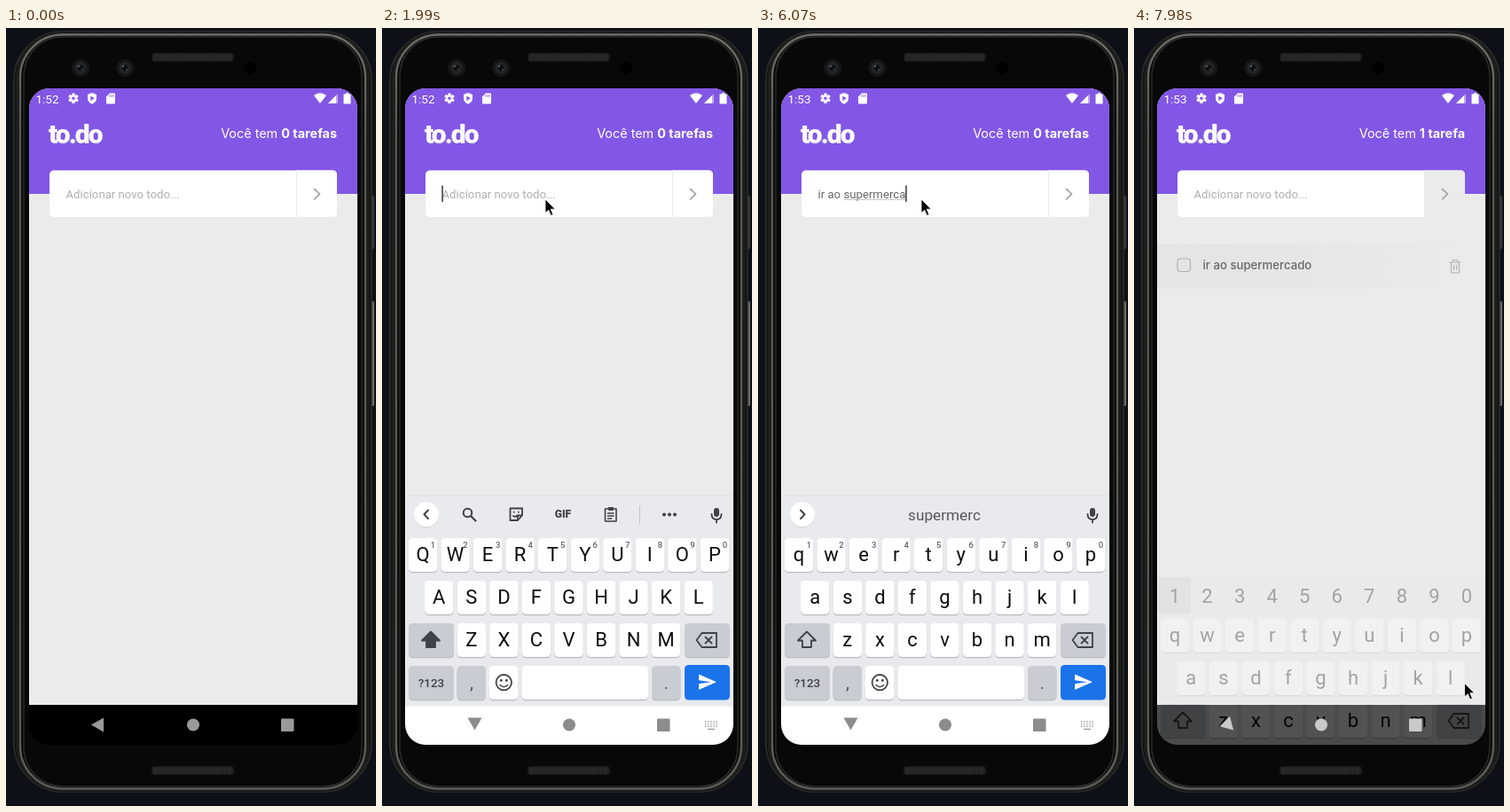
Recreate the animation shown at these times as an HTML page. Size 417 by 877 pixels, loop 8000 ms.

```html
<!DOCTYPE html>
<html lang="pt">
<head>
<meta charset="utf-8">
<title>to.do</title>
<style>
html, body { margin: 0; width: 100%; height: 100%; overflow: hidden; background: #0d1117; }
svg { display: block; }
text { font-family: Roboto, sans-serif; white-space: pre; }
.inter { font-family: Inter, sans-serif; }
.mid { text-anchor: middle; }
.line { fill: none; stroke-linecap: round; stroke-linejoin: round; }
</style>
</head>
<body>
<svg id="stage" width="417" height="877" viewBox="0 0 417 877"></svg>
<script>
const LOOP = 8000;
const COL = 36.55;
const colX = i => 46 + i * COL;

const rect = (x, y, w, h, r, fill, more = '') =>
  `<rect x="${x}" y="${y}" width="${w}" height="${h}" rx="${r}" fill="${fill}" ${more}/>`;
const circle = (x, y, r, fill, more = '') =>
  `<circle cx="${x}" cy="${y}" r="${r}" fill="${fill}" ${more}/>`;
const path = (d, fill, more = '') => `<path d="${d}" fill="${fill}" ${more}/>`;
const line = (d, stroke, w, more = '') =>
  `<path class="line" d="${d}" stroke="${stroke}" stroke-width="${w}" ${more}/>`;
const text = (x, y, size, fill, str, more = '') =>
  `<text x="${x}" y="${y}" font-size="${size}" fill="${fill}" ${more}>${str}</text>`;
const mid = 'class="mid"';

function phone() {
  const ring = (x, y, r, stroke, w, fill = 'none') =>
    rect(x, y, 421 - 2 * x, 865 - 2 * y, r, fill, `stroke="${stroke}" stroke-width="${w}"`);
  const grille = y => rect(164, y, 93, 10, 4, '#1d1d1d') +
    `<path d="M167 ${y + 5}H254" stroke="#343434" stroke-width="7" stroke-dasharray="1 1.4"/>`;
  const lens = x => circle(x, 45, 10, '#171718') + circle(x, 45, 6.5, '#242527') +
    circle(x, 45, 3.4, '#0d0e10') + circle(x - 2, 43, 1.3, '#55595e') + circle(x + 2, 47, 1, '#45484c');
  return rect(410, 189, 5, 60, 1.5, '#3b3a38') + rect(410.5, 308, 4.5, 118, 1.5, '#6d6b67') +
    ring(9, 4, 55, '#30302f', 1.5, '#050505') +
    ring(12.5, 6, 51, '#1c1c1b', 4) +
    ring(16, 7.5, 48, 'url(#edge)', 2.5) +
    ring(20, 10, 44, '#2a2a29', 1.5, '#080808') +
    grille(28) + grille(832) + lens(84) + lens(134) + circle(275, 45, 7, '#000');
}

function statusBar() {
  const teeth = [0, 60, 120].map(a =>
    rect(74.4, 73.4, 3.2, 11.6, .6, '#fff', `transform="rotate(${a} 76 79.2)"`)).join('');
  return text(33.5, 84.5, 13.5, '#fff', '1:52', 'id="clock"') +
    teeth + circle(76, 79.2, 4.2, '#fff') + circle(76, 79.2, 1.8, '#8257e5') +
    path('M97 73l5 2v4q0 4.5-5 6.7q-5-2.2-5-6.7v-4z', '#fff') + path('M95.3 76.5l4.6 2.7-4.6 2.7z', '#8257e5') +
    path('M117 73.5h5q1 0 1 1v10q0 1-1 1h-8q-1 0-1-1v-7z', '#fff') +
    line('M117 75.5v2M119 75.5v2M121 75.5v2', '#8257e5', .8) +
    path('M347 76q7-5.5 14 0l-7 9z', '#fff') +
    path('M374 74v11h-11z', '#fff', 'opacity=".45"') + path('M372 76v9h-9z', '#fff') +
    path('M383 73.2h3v1.3h2.5v11h-8v-11h2.5z', '#fff');
}

function appView() {
  const trash = line('M356 264h12M357.5 264v11q0 1 1 1h7q1 0 1-1v-11M359.5 264v-2.5h5v2.5M360.5 267.5v5M363.5 267.5v5', '#b2b2b2', 1.2);
  return rect(26, 68, 370, 740, 0, '#000') + rect(26, 68, 370, 695, 0, '#ebebeb') +
    rect(26, 68, 370, 119, 0, '#8257e5') + statusBar() +
    text(48, 130, 30, '#fff', 'to.do', 'font-weight="900" letter-spacing="-2"') +
    text(373, 123.5, 14.4, '#fff', 'Você tem <tspan id="count" font-weight="700">0 tarefas</tspan>', 'class="inter" text-anchor="end"') +
    rect(49, 160.5, 324, 52.5, 5, '#fff') +
    `<path id="add" d="M327.5 160.5H368q5 0 5 5V208q0 5-5 5H327.5z" fill="#fff"/>` +
    line('M327.5 161v52', '#ebebeb', 1) + line('M347.5 181.5l6 5.7-6 5.7', '#a5a5aa', 1.8) +
    text(67.5, 191.8, 13.2, '#666', '', 'id="field"') +
    rect(97, 193.2, 0, .8, 0, '#b4b4b4', 'id="under"') + rect(67, 177.5, 1.6, 18.5, 0, '#444', 'id="caret"') +
    `<g id="item">${rect(26, 243, 354, 50.5, 0, 'url(#fade)')}
      ${rect(49, 260, 14.5, 14.5, 3.5, 'none', 'stroke="#b2b2b2" stroke-width="1.2"')}
      ${text(77.5, 272, 13.2, '#666', 'ir ao supermercado', 'class="inter" font-weight="500"')}${trash}</g>`;
}

function keyboard() {
  const ink = '#3f4246', dark = '#c9ccd3';
  const key = (x, y, w, fill) => rect(x, y + 1.2, w, 38, 4.5, '#b9bbc0') + rect(x, y, w, 38, 4.5, fill);
  const row = (letters, start, y) => [...letters].map((c, i) => {
    const x = colX(start + i);
    return key(x - 16.2, y, 32.4, '#fff') +
      text(x, y + 26, 22, '#0c0d0e', c, 'class="mid letter"');
  }).join('');
  const digits = '1234567890';
  const hints = [...digits].map((c, i) => text(colX(i) + 11.5, 586, 9.5, '#5f6368', c, mid + ' font-weight="500"')).join('');
  const round = d => circle(50, 549.2, 14.2, '#d5d7da') + circle(50, 548.3, 14, '#fff') + line(d, ink, 2);
  const mic = rect(374, 541, 6, 10, 3, ink) + line('M371.5 548q0 6 5.5 6t5.5-6M377 554v3.5', ink, 1.8);
  const tools = `<g id="tools">${rect(72, 528, 53, 41, 0, '#d8d9dd', 'id="lit"')}
    ${round('M52 543.5l-4.5 4.8 4.5 4.8')}
    ${circle(96.5, 546.5, 4.8, 'none', `stroke="${ink}" stroke-width="2"`)}${line('M100.5 550.5l5 5', ink, 2.2)}
    ${line('M144.5 541.5h13.5v8l-5 5.5h-8.5zM158 549.5h-5v5.5M148 550q2.5 2 4-.5', ink, 1.8)}
    ${circle(148.7, 545.7, 1, ink)}${circle(153.8, 545.7, 1, ink)}
    ${text(204, 552, 12, ink, 'GIF', mid + ' font-weight="900"')}
    ${line('M251.5 542h12.5v14h-12.5zM254.5 547h6.5M254.5 550h6.5M254.5 553h4', ink, 1.6)}${rect(255, 540, 6, 4, 1, ink)}
    ${line('M290.5 539v20', '#c5c7ca', 1)}
    ${[318, 324, 330].map(x => circle(x, 548.5, 2, ink)).join('')}${mic}</g>`;
  const hintsBar = `<g id="sugs">${round('M48 543.5l4.5 4.8-4.5 4.8')}
    <path id="bars" d="M156.5 538v22M264 538v22" stroke="#c3c5c9"/>
    ${[109, 210, 311].map(x => text(x, 555, 17.2, '#54575b', '', 'class="mid sug"')).join('')}${mic}</g>`;
  const numbers = `<g id="nums">${rect(27, 528, 37, 41, 0, '#d2d2d4')}
    ${[...digits].map((c, i) => text(colX(i), 557, 22, '#0c0d0e', c, mid)).join('')}</g>`;
  return rect(26, 526.5, 370, 2, 0, '#e2e3e5') + rect(26, 528, 370, 237, 0, '#e8eaed') +
    rect(26, 764.5, 370, 140, 0, '#fff') + tools + hintsBar + numbers +
    row('qwertyuiop', 0, 575) + `<g id="hints">${hints}</g>` +
    row('asdfghjkl', .5, 623) + row('zxcvbnm', 1.5, 671) +
    key(30, 671, 51, dark) + line('M45 690.5l10-10 10 10h-5v7.5h-10v-7.5z', ink, 1.8, 'id="shift"') +
    key(341, 671, 51, dark) +
    line('M354.5 690l6-8h16.5v16h-16.5zM364.5 686.5l7 7M371.5 686.5l-7 7', ink, 1.8) +
    key(30, 719, 51, dark) + text(55.5, 742.5, 13.5, ink, '?123', mid + ' font-weight="500"') +
    key(84.6, 719, 32.4, dark) + text(101, 745, 18, ink, ',', mid) +
    key(121, 719, 32.4, '#fff') + circle(137.3, 737.7, 8.7, 'none', `stroke="${ink}" stroke-width="1.8"`) +
    circle(134.3, 735.5, 1.4, ink) + circle(140.3, 735.5, 1.4, ink) + line('M133 740.5q4.3 4.5 8.6 0', ink, 1.6) +
    key(157.5, 719, 142.5, '#fff') + key(304, 719, 32.5, dark) + text(320.3, 745, 18, ink, '.', mid) +
    rect(341, 718, 51, 39.5, 4.5, '#1a73e8', 'id="send"') +
    path('M357 728.5l20 8.8-20 8.8v-6.8l14-2-14-2z', '#fff');
}

function navBar() {
  const dots = [0, 1, 2].map(r => `M364 ${782 + r * 2.6}h14`).join('');
  return `<g id="nav"><path id="back" d="M96 785.5l14-8v16z"/><circle cx="211" cy="785.5" r="7"/>
    <rect x="310" y="778.5" width="14.5" height="14.5" rx="1.2"/></g>
    <g id="hide"><path d="${dots}" stroke="#999" stroke-width="1.4" stroke-dasharray="1.5 1.6"/>
    <path d="M367 790.3h8" stroke="#999" stroke-width="1.3"/></g>`;
}

const stage = document.getElementById('stage');
stage.innerHTML = `<defs><clipPath id="screen"><rect x="26" y="68" width="370" height="740" rx="23"/></clipPath>
  <linearGradient id="edge" x2="0" y2="1"><stop stop-color="#6c6c68"/><stop offset=".15" stop-color="#565653"/>
  <stop offset="1" stop-color="#5c5c58"/></linearGradient>
  <linearGradient id="fade"><stop stop-color="#e4e4e4"/><stop offset=".45" stop-color="#e6e6e6"/>
  <stop offset="1" stop-color="#ebebeb"/></linearGradient></defs>` + phone() +
  `<g clip-path="url(#screen)">${appView()}<g id="kb">${keyboard()}</g>${navBar()}</g>` +
  path('M0 0V15.5L3.7 12.2L6.2 18.4L8.8 17.2L6.3 11.2H11.2z', '#000', 'id="mouse" stroke="#fff" stroke-width=".8"');

const el = {};
stage.querySelectorAll('[id]').forEach(n => el[n.id] = n);
const letters = [...stage.querySelectorAll('.letter')];
const sugs = [...stage.querySelectorAll('.sug')];

// time, field text, is the last word underlined, suggestions
const typing = [
  [0, '', 0, ''],
  [2190, 'i', 0, 'I|in|is'],
  [2260, 'i', 1, 'i|in|is'],
  [2460, 'ir', 1, 'ir|it|its'],
  [2660, 'ir ', 0, 'is|to|the'],
  [2730, 'ir a', 0, 'a|and|are'],
  [2860, 'ir ao', 0, 'a|and|are'],
  [3060, 'ir ao', 1, 'ao|so|about'],
  [3260, 'ir ao ', 0, 'ao|so|about'],
  [3330, 'ir ao ', 0, 'the|to|and'],
  [3590, 'ir ao s', 0, 'the|to|and'],
  [3660, 'ir ao s', 1, 's|so|is'],
  [3790, 'ir ao su', 1, 's|so|is'],
  [3990, 'ir ao su', 1, 'su|sure|Sunday'],
  [4330, 'ir ao sup', 1, 'su|sure|Sunday'],
  [4400, 'ir ao supe', 1, 'sup|super|support'],
  [4600, 'ir ao super', 1, 'supe|super|Superfine'],
  [4800, 'ir ao super', 1, 'super|supervisor|Superfine'],
  [5330, 'ir ao superm', 1, 'super|supervisor|Superfine'],
  [5400, 'ir ao superm', 1, 'superm|supermarket|supermodel'],
  [5600, 'ir ao superme', 1, 'superme|supermen|'],
  [5800, 'ir ao supermer', 1, 'superme|supermen|'],
  [5870, 'ir ao supermerc', 1, '|supermerc|'],
  [6070, 'ir ao supermerca', 1, '|supermerc|'],
  [6140, 'ir ao supermerca', 1, '|supermerca|'],
  [6270, 'ir ao supermercad', 1, '|supermerca|'],
  [6340, 'ir ao supermercado', 1, '|supermercad|'],
  [6540, 'ir ao supermercado', 1, '|supermercado|'],
  [7780, 'ir ao supermercado', 0, '|supermercado|'],
  [7920, '', 0, '||']
];
const enter = [[383, 90], [338, 178], [282, 250], [228, 273], [194, 226], [184, 193]];

const clamp = v => Math.max(0, Math.min(1, v));
const between = (t, a, b) => t >= a && t < b;
const show = (node, on) => node.style.display = on ? '' : 'none';
const set = (node, attrs) => { for (const k in attrs) node.setAttribute(k, attrs[k]); };

function mouseAt(t) {
  if (t < 6870) return enter[Math.min(5, Math.floor((t - 290) / 70))];
  const k = clamp((Math.floor((t - 6870) / 70) + 1) / 12);
  const s = k * k * (3 - 2 * k), r = 1 - s;
  const bend = (a, c, b) => r * r * a + 2 * r * s * c + s * s * b;
  return [bend(184, 120, 372.5), bend(193, 480, 738.5)];
}

// keyboard offset, opacity and back arrow angle
function keyboardAt(t) {
  if (t < 920) return [130, 0, 0];
  if (t >= 7980) return [91, .32, -15];
  if (t >= 7920) return [28, .75, -60];
  if (t >= 1330) return [0, 1, -90];
  const h = 920 + Math.floor((t - 920) / 67.5) * 67.5;
  return [130 * Math.exp((920 - h) / 83), clamp((h - 880) / 190), -90 * clamp((h - 1000) / 250)];
}

function drawField(t) {
  const [, str, lined, list] = typing.findLast(s => t >= s[0]);
  const f = el.field;
  f.textContent = str;
  const width = str ? f.getComputedTextLength() : 0;
  const head = str.lastIndexOf(' ') + 1;
  const start = lined && head ? f.getSubStringLength(0, head) : 0;
  set(el.under, { x: 67.5 + start, width: lined ? width - start : 0 });
  set(el.caret, { x: 67.3 + width });
  show(el.caret, between(t, 920, 1460) || between(t, 1990, 7070) || between(t, 7550, 7710));
  if (!str) f.textContent = 'Adicionar novo todo...';
  set(f, { fill: str ? '#666' : '#b0b0b3' });
  const words = list.split('|');
  sugs.forEach((n, i) => n.textContent = words[i] || '');
  show(el.bars, words[0]);
}

function render(t) {
  drawField(t);
  const done = t >= 7920, last = t >= 7980, upper = t < 2190;
  el.clock.textContent = t < 3660 ? '1:52' : '1:53';
  el.count.textContent = done ? '1 tarefa' : '0 tarefas';
  set(el.add, { fill: last ? '#ebebeb' : done ? '#f1f1f3' : t >= 7850 ? '#f8f8fa' : '#fff' });
  set(el.item, { opacity: last ? 1 : done ? .5 : 0 });

  const [dy, alpha, turn] = keyboardAt(t);
  set(el.kb, { transform: `translate(0 ${dy})`, opacity: alpha });
  set(el.back, { transform: `rotate(${turn} 103.25 784.25)` });
  const open = between(t, 1120, 7920);
  set(el.nav, { fill: last ? '#c9c9c9' : open ? '#8c8c8c' : '#999' });
  show(el.hide, open);
  show(el.tools, upper);
  show(el.sugs, !upper && !done);
  show(el.nums, done);
  show(el.hints, !done);
  set(el.lit, { opacity: t < 1260 ? 1 : t < 1330 ? .5 : 0 });
  set(el.shift, { style: `fill:${upper ? '#3f4246' : 'none'}` });
  letters.forEach(n => {
    const c = n.textContent;
    n.textContent = upper ? c.toUpperCase() : c.toLowerCase();
  });
  set(el.send, { fill: t >= 7710 ? '#185abc' : '#1a73e8' });

  show(el.mouse, t >= 290);
  if (t >= 290) set(el.mouse, { transform: `translate(${mouseAt(t).join(' ')})` });
}

const begin = performance.now();
function tick() {
  render((performance.now() - begin) % LOOP);
  requestAnimationFrame(tick);
}
tick();
</script>
</body>
</html>
```
